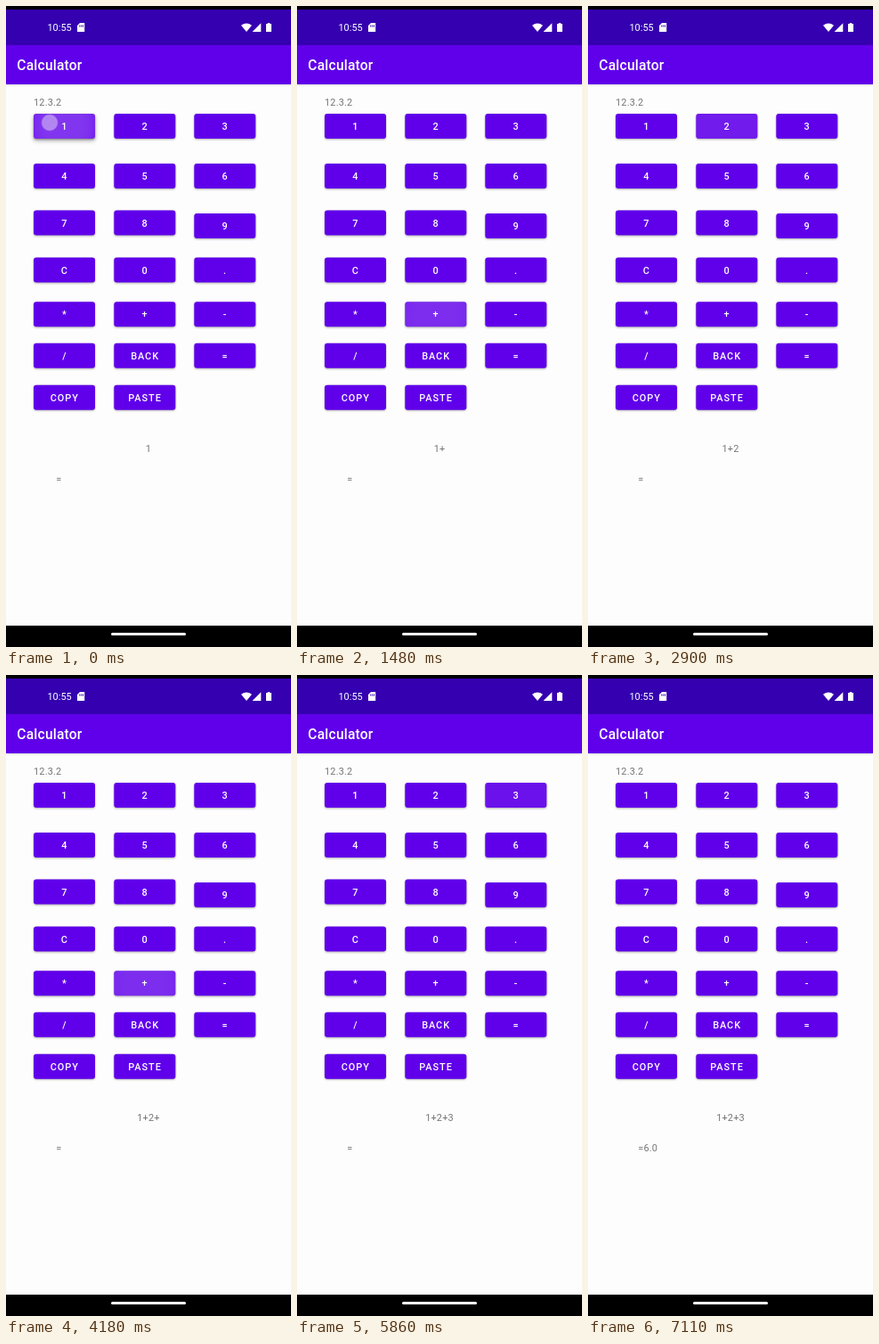
An HTML page that plays this animation: 320 px wide and 720 px high, repeating every 8000 ms.

```html
<!DOCTYPE html>
<html lang="en">
<head>
<meta charset="utf-8">
<title>Calculator</title>
<style>
  html, body { margin: 0; width: 100%; height: 100%; overflow: hidden; background: #000; }
  svg { display: block; width: 100vw; height: 100vh; }
  text { font-family: Roboto, "Open Sans", sans-serif; }
  .label { font-size: 10.9px; font-weight: 500; letter-spacing: .97px; fill: #fff; text-anchor: middle; }
  .body { font-size: 10.9px; letter-spacing: .2px; fill: #757575; }
</style>
</head>
<body>
<svg viewBox="0 0 320 720">
  <defs>
    <filter id="soft" x="-30%" y="-60%" width="160%" height="220%"><feGaussianBlur stdDeviation="1"/></filter>
    <filter id="lift" x="-30%" y="-60%" width="160%" height="220%"><feGaussianBlur stdDeviation="2.8"/></filter>
    <radialGradient id="glow" gradientUnits="userSpaceOnUse"></radialGradient>
    <radialGradient id="spot">
      <stop offset="0" stop-color="#eee8f6" stop-opacity=".76"/>
      <stop offset=".68" stop-color="#eee8f6" stop-opacity=".76"/>
      <stop offset=".8" stop-color="#e4dcf2" stop-opacity=".88"/>
      <stop offset="1" stop-color="#d8d0e8" stop-opacity="0"/>
    </radialGradient>
  </defs>

  <rect width="320" height="720"/>
  <rect y="4" width="320" height="40" fill="#3500b0"/>
  <rect y="88" width="320" height="608" fill="#fdfdfd"/>
  <rect y="86" width="320" height="3" opacity=".15" filter="url(#soft)"/>
  <rect y="44" width="320" height="44" fill="#6000ea"/>
  <rect x="118" y="704" width="84" height="3" rx="1.5" fill="#fff"/>

  <g fill="#fff">
    <text x="46.5" y="28" font-size="10.9">10:55</text>
    <path d="M83 19h5.2v10H80V22zM82.3 21.6v2h1v-2zM84.2 21.6v2h1v-2zM86 21.6v2h1v-2z" fill-rule="evenodd"/>
    <path d="M264 21.8Q270 17 276 21.8L270 29z"/>
    <path d="M286.3 19.3V29H276.6z"/>
    <path d="M293.8 19h2.4v1.1h1.8V29h-6v-8.9h1.8z"/>
    <text x="12.3" y="72.3" font-size="15.6" font-weight="500" letter-spacing=".2">Calculator</text>
  </g>

  <g id="shadows"></g>
  <rect id="raised" width="69" height="28" rx="3" filter="url(#lift)"/>
  <g id="keys"></g>
  <rect id="ripple" width="69" height="28" rx="3" fill="url(#glow)"/>
  <g id="labels"></g>

  <text class="body" x="31" y="112">12.3.2</text>
  <text class="body" id="sum" x="160" y="501" text-anchor="middle"></text>
  <text class="body" id="result" x="56.3" y="535"></text>
  <circle id="dot" r="10" fill="url(#spot)"/>
</svg>
<script>
  const LOOP = 8000;
  const $ = id => document.getElementById(id);
  const clamp = v => Math.min(1, Math.max(0, v));
  const ramp = (t, from, span) => clamp((t - from) / span);
  const mix = (a, b, k) => a + (b - a) * k;

  // Cubic Bezier easing (.4, 0, .2, 1)
  function ease(x) {
    let low = 0, high = 1, s = .5;
    for (let i = 0; i < 16; i++) {
      s = (low + high) / 2;
      const at = 1.2 * (1 - s) ** 2 * s + .6 * (1 - s) * s * s + s ** 3;
      if (at < x) low = s; else high = s;
    }
    return 3 * (1 - s) * s * s + s ** 3;
  }

  function set(el, attrs) {
    for (const name in attrs) el.setAttribute(name, attrs[name]);
    return el;
  }
  function add(parent, tag, attrs) {
    const el = document.createElementNS("http://www.w3.org/2000/svg", tag);
    $(parent).appendChild(el);
    return set(el, attrs);
  }

  // Smoothstep edge over the outer two thirds of the glow
  for (let k = 0; k <= 1; k += .125) {
    add("glow", "stop", {
      offset: mix(1 / 3, 1, k),
      "stop-color": "#fff",
      "stop-opacity": 1 - k * k * (3 - 2 * k)
    });
  }

  const columns = [31, 121.3, 211.3];
  const rows = [
    [121, "1", "2", "3"],
    [177, "4", "5", "6"],
    [229.5, "7", "8", "9"],
    [282.5, "C", "0", "."],
    [332.3, "*", "+", "-"],
    [378.8, "/", "BACK", "="],
    [425.7, "COPY", "PASTE"]
  ];
  const keys = {};

  for (const [top, ...names] of rows) {
    names.forEach((name, i) => {
      const x = columns[i];
      const y = name === "9" ? 233 : top;
      const box = { x, width: 69, height: 28, rx: 3 };
      keys[name] = { x, y };
      add("shadows", "rect", { ...box, y: y + .9, opacity: .32, filter: "url(#soft)" });
      add("keys", "rect", { ...box, y, fill: "#6000ea" });
      add("labels", "text", { class: "label", x: x + 34.8, y: y + 18 }).textContent = name;
    });
  }

  // Press time, key, touch point, sum and result after the tap
  const taps = [
    [-400, "1", 49, 131, "1", "="],
    [920, "+", 158, 340, "1+", "="],
    [2210, "2", 155.5, 125, "1+2", "="],
    [3620, "+", 157, 340, "1+2+", "="],
    [5100, "3", 247, 126, "1+2+3", "="],
    [6190, "=", 246, 388, "1+2+3", "=6.0"]
  ];
  const RELEASE = 320;
  const DELAY = 65, ENTER = 450, EXIT = 375;
  const RADIUS = 2.3 * Math.hypot(34.5, 14);

  function draw(time) {
    const index = taps.findLastIndex(tap => tap[0] <= time);
    const [start, name, tx, ty] = taps[index];
    const t = time - start;
    const { x, y } = keys[name];

    const shown = t >= RELEASE + 30 ? index : Math.max(0, index - 1);
    $("sum").textContent = taps[shown][4];
    $("result").textContent = taps[shown][5];

    const lift = ramp(t, DELAY, 100) - ramp(t, RELEASE + 90, 100);
    set($("raised"), { x, y: y + 2.5, opacity: .28 * lift });

    // The ripple spreads in the first half of its progress and fades in the second
    const enter = ease(ramp(t, DELAY, ENTER));
    const progress = (enter + ramp(t, DELAY + ENTER, EXIT)) / 2;
    const light = Math.min(ramp(progress, 0, .13), 1 - ramp(progress, .4, .6));
    set($("glow"), {
      cx: mix(tx, x + 34.5, enter),
      cy: mix(ty, y + 14, enter),
      r: 1.5 * RADIUS * progress
    });
    set($("ripple"), { x, y, opacity: .24 * light });

    set($("dot"), { cx: tx, cy: ty, opacity: 1 - ramp(t, RELEASE, 200) });
  }

  const origin = performance.now();
  function tick() {
    draw((performance.now() - origin) % LOOP);
    requestAnimationFrame(tick);
  }
  tick();
</script>
</body>
</html>
```
